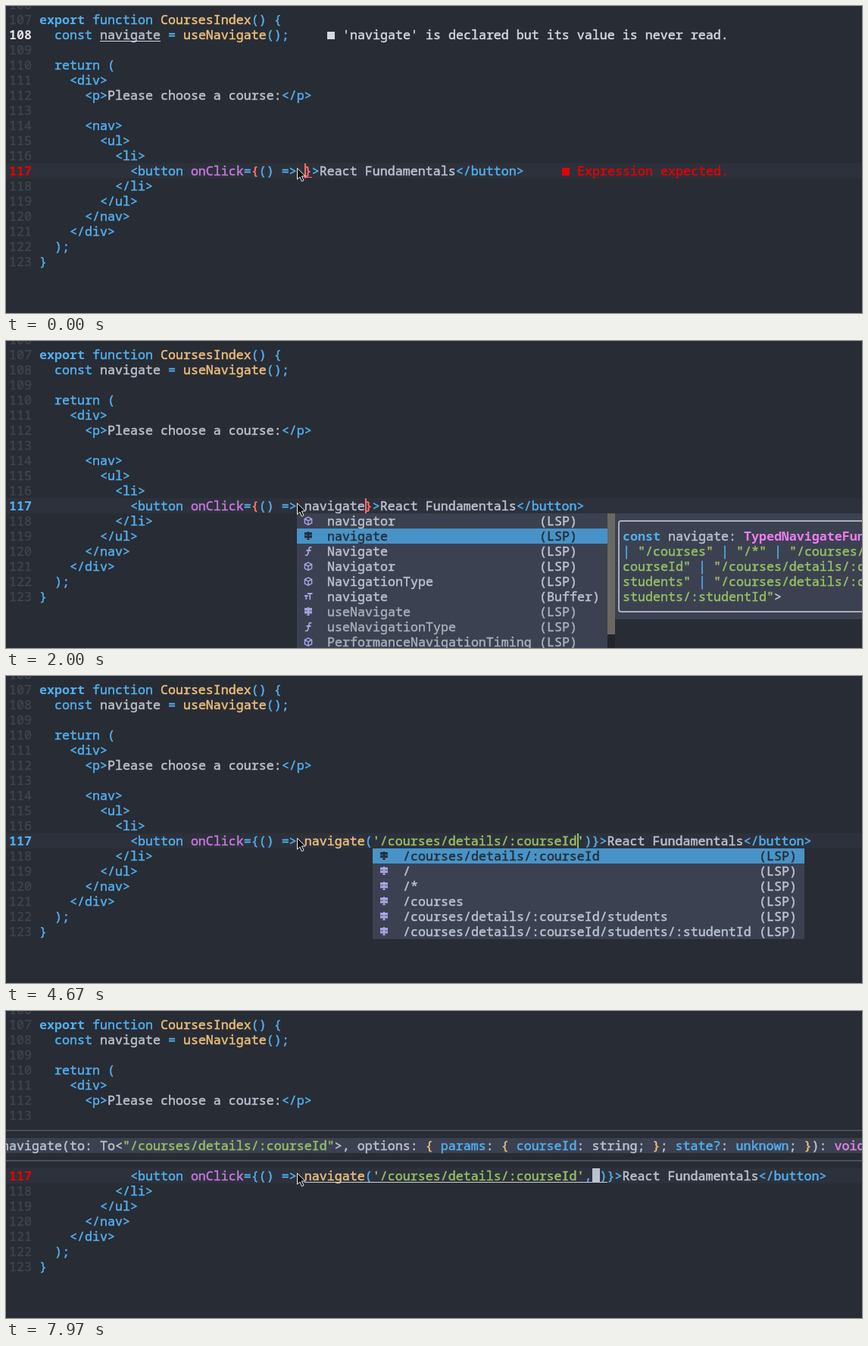
An HTML page for the animation above (8 s loop, 1130x406 px).

```html
<!DOCTYPE html>
<html lang="en">
<head>
<meta charset="utf-8">
<title>Editor</title>
<style>
html, body { margin: 0; width: 100%; height: 100%; overflow: hidden; background: #282c34; }
#stage { position: relative; width: 1130px; height: 406px; overflow: hidden; }
#stage * { position: absolute; }
pre { margin: 0; font: 500 16.667px/20px "Noto Sans Mono", monospace; color: #bbc2cf;
  font-variant-ligatures: none; white-space: pre; -webkit-text-stroke: .5px currentColor; }
#stage span { position: static; }
.b { color: #51afef } .B { color: #51afef; font-weight: 700 }
.y { color: #ecbe7b } .m { color: #c678dd } .g { color: #98be65 }
.r { color: #ff6c6b; font-weight: 700 } .M { color: #f07cf2; font-weight: 700 } .p { color: #e582ea }
.n { color: #3f444c } .W { color: #dfdfdf; font-weight: 700 } .w { color: #d4d8df }
.e { color: #e60000 } .E { color: #e60000; font-weight: 700 } .d { color: #a8aeba } .k { color: #282c34 }
.B, .r, .M, .W, .E { -webkit-text-stroke-width: 0; }
svg { overflow: visible; }
</style>
</head>
<body>
<div id="stage">
  <div id="code"></div>
  <svg width="14" height="20" style="left:384px;top:214px;z-index:2">
    <path d="M.5 .5V15.2L3.9 12 6.4 17.8 9 16.7 6.5 11H11.2Z" fill="#111" stroke="#eee"/>
  </svg>
</div>
<script>
const BG = '#282c34', PANEL = '#3b4150';
const esc = s => s.replace(/&/g, '&amp;').replace(/</g, '&lt;');

// Parts are separated by "~"; the first letter of each is its colour class.
const paint = s => s.split('~').map(p => `<span class="${p[0]}">${esc(p.slice(1))}</span>`).join('');
const text = (x, y, s) => `<pre style="left:${x}px;top:${y}px">${paint(s)}</pre>`;
const rect = (x, y, w, h, color) =>
  `<div style="left:${x}px;top:${y}px;width:${w}px;height:${h}px;background:${color}"></div>`;
const rowY = n => 8 + (n - 107) * 20;

const lines = {
  107: 'Bexport~b function ~yCoursesIndex~b() {',
  108: 'b  const ~fnavigate~b = ~yuseNavigate~b();',
  110: 'b  return (',
  111: 'b    <div>',
  112: 'b      <p>~fPlease choose a course:~b</p>',
  114: 'b      <nav>',
  115: 'b        <ul>',
  116: 'b          <li>',
  118: 'b          </li>',
  119: 'b        </ul>',
  120: 'b      </nav>',
  121: 'b    </div>',
  122: 'b  );',
  123: 'b}'
};

const icons = {
  cube: '<path d="M5 .8 9.6 3.2V8.8L5 11.2.4 8.8V3.2ZM.4 3.2 5 5.8 9.6 3.2M5 5.8V11" fill="none" stroke="currentColor" stroke-width="1.5"/>',
  sign: '<path d="M0 1H10V4.4H0ZM0 5.2H10V8.6H0ZM4 0H6V11H4ZM3 10H7V11H3Z" fill="currentColor"/>',
  func: '<path d="M9.5 1Q6.5 -.2 6 3L4.6 9.5Q4 12.2 1 11.2M2.5 5H8.5" fill="none" stroke="currentColor" stroke-width="1.8"/>',
  type: '<path d="M0 5H5M2.3 5V10M4 2H10.5M7.3 2V10" fill="none" stroke="currentColor" stroke-width="1.8"/>'
};
const names = {
  x: 384, width: 410, kind: 704, scroll: true,
  items: ['cube navigator', 'sign navigate', 'func Navigate', 'cube Navigator', 'cube NavigationType',
    'type navigate', 'sign useNavigate', 'func useNavigationType', 'cube PerformanceNavigationTiming']
};
const routes = {
  x: 484, width: 570, kind: 994,
  items: ['/courses/details/:courseId', '/', '/*', '/courses', '/courses/details/:courseId/students',
    '/courses/details/:courseId/students/:studentId'].map(s => 'sign ' + s)
};

function menu({ x, width, kind, scroll, items }, picked) {
  let out = rect(x, 228, width, items.length * 20, PANEL);
  if (scroll) out += rect(x + width, 228, 10, 160, '#6b6862') + rect(x + width, 388, 10, 18, '#21242b');
  items.forEach((item, i) => {
    const [icon, label] = item.split(' '), y = 228 + i * 20, on = i === picked;
    const tone = on ? 'k' : scroll && i > 5 ? 'd' : 'f';
    if (on) out += rect(x, y, width, 20, '#4793c8');
    out += `<svg width="11" height="12" style="left:${x + 10}px;top:${y + 4}px;color:${on ? BG : '#a9a1e1'}">${icons[icon]}</svg>`
      + text(x + 40, y, tone + label)
      + text(kind, y, tone + (icon === 'type' ? '(Buffer)' : '(LSP)'));
  });
  return out;
}

const docs = [
  ['Bvar ~fnavigator: ~MNavigator'],
  ['Bconst ~fnavigate: ~MTypedNavigateFunction~f<~g"/"',
    'b| ~g"/courses"~b | ~g"/*"~b | ~g"/courses/details/:',
    'gcourseId"~b | ~g"/courses/details/:courseId/',
    'gstudents"~b | ~g"/courses/details/:courseId/',
    'gstudents/:studentId"~f>']
];
function doc(rows, width) {
  const h = rows.length * 20;
  return rect(804, 228, width, h + 40, PANEL)
    + `<div style="left:808px;top:237px;width:${width - 12}px;height:${h + 18}px;border:2px solid #a9b0bd;border-radius:4px"></div>`
    + rows.map((s, i) => text(814, 248 + i * 20, s)).join('');
}

const signature = () => rect(0, 148, 1130, 60, BG) + rect(0, 157, 1130, 2, '#484d56')
  + rect(0, 197, 1130, 2, '#484d56') + rect(0, 168, 1130, 20, PANEL)
  + text(-6, 168, 'fnavigate(to: To<~g"/courses/details/:courseId"~f>, options: ~y{ ~bparams~f: ~y{ ~bcourseId'
    + '~f: string; ~y}~f; ~bstate?~f: ~bunknown~f; ~y}~f): ~pvoid');

// [start ms, handler with "|" as the caret, extras]
const call = "navigate('/courses/details/:courseId";
const steps = [
  [0, '|', { errors: true }],
  [300, 'n|', { errors: true }],
  [420, 'na|', { errors: true }],
  [540, 'nav|', { errors: true }],
  [660, 'navi|', { menu: names }],
  [780, 'navig|', { menu: names }],
  [1450, 'navigator|', { menu: names, pick: 0, docWidth: 260 }],
  [1750, 'navigate|', { menu: names, pick: 1, docWidth: 420 }],
  [2700, 'navigate(|)', {}],
  [3380, "navigate('|')", {}],
  [3550, "navigate('|')", { menu: routes }],
  [4600, call + "|')", { menu: routes, pick: 0 }],
  [5250, call + ",|')", {}],
  [5650, call + ", |')", {}],
  [5950, call + ",|')", {}],
  [6100, call + "|')", {}],
  [6300, call + "'|)", {}],
  [6550, call + "',|)", {}],
  [7050, call + "', |)", {}],
  [7560, call + "',| )", { normal: true }],
  [7700, call + "',| )", { normal: true, flagged: true }],
  [7830, call + "',| )", { normal: true, flagged: true, help: true }]
];

function handler(body, next) {
  const [, name, open, str, rest, close] = body.match(/^(\w*)(\(?)('[^']*')?(.*?)(\)?)$/);
  const brace = next === '}' ? 'r' : 'b', paren = next === ')' ? 'r' : 'b';
  return `b            <button ~monClick~b=~${brace}{~b() => ~${open ? 'y' : 'f'}${name}~${paren}${open}`
    + `~g${str || ''}~b${rest}~${paren}${close}~${brace}}~b>~fReact Fundamentals~b</button>`;
}

function render([, marked, o]) {
  const at = marked.indexOf('|'), body = marked.replace('|', ''), caret = 394 + at * 10;
  const next = o.normal ? '' : (body + '}')[at];
  let out = rect(0, 208, 1130, 20, '#2d313b');
  for (let n = 106; n < 124; n++) {
    let tone = 'n';
    if (n === 117) tone = o.errors || o.flagged ? 'E' : 'B';
    if (n === 108 && o.errors) tone = 'W';
    out += text(4, rowY(n), tone + n);
    if (lines[n]) out += text(44, rowY(n), lines[n]);
  }
  out += text(44, 208, handler(body, next));
  if (o.errors) {
    const x = 734 + body.length * 10;
    out += rect(124, 46, 80, 1, '#d4d8df') + rect(424, 34, 10, 10, '#d4d8df')
      + text(444, 28, "w'navigate' is declared but its value is never read.")
      + rect(caret, 226, 10, 1, '#ff6c6b') + rect(x, 214, 10, 10, '#e60000')
      + text(x + 20, 208, 'eExpression expected.');
  }
  if (o.flagged) out += rect(394, 226, body.length * 10, 1, '#c8cdd6');
  out += o.normal ? rect(caret, 208, 10, 19, '#bbc2cf')
    : rect(caret, 208, 2, 20, next === "'" ? '#98be65' : '#ff6c6b');
  if (o.menu) out += menu(o.menu, o.pick);
  if (o.docWidth) out += doc(docs[o.pick], o.docWidth);
  if (o.help) out += signature();
  return out;
}

const code = document.getElementById('code');
let shown;
function tick() {
  const t = performance.now() % 8000;
  const step = steps.filter(s => s[0] <= t).pop();
  if (step !== shown) code.innerHTML = render(shown = step);
  requestAnimationFrame(tick);
}
tick();
</script>
</body>
</html>
```
